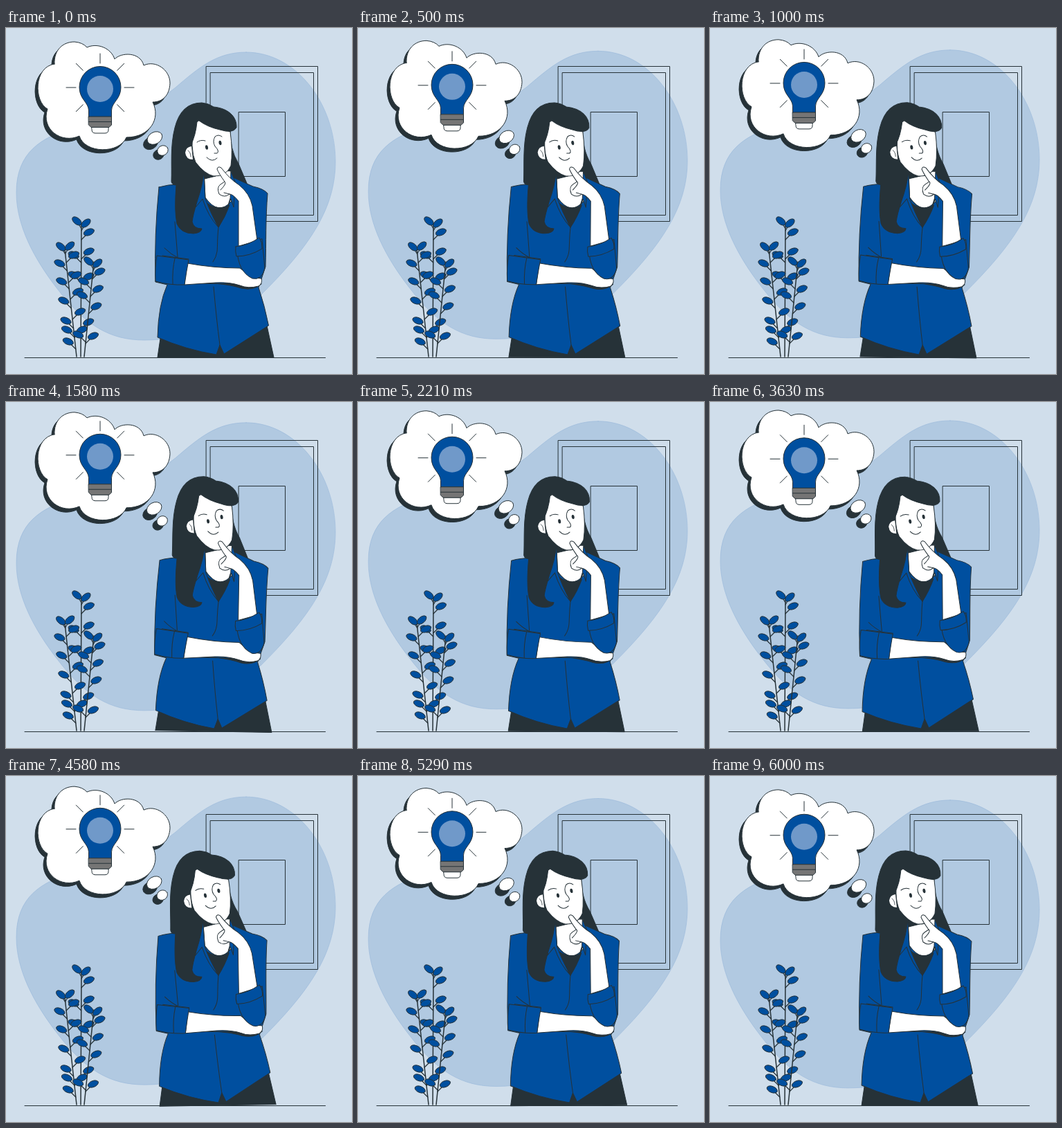
Recreate the animation shown at these times as an HTML page with a canvas. Size 500 by 500 pixels, loop 6.04 s.

```html
<!DOCTYPE html>
<html lang="en">
<head>
<meta charset="utf-8">
<title>Thinking of an idea</title>
<style>
html, body { margin: 0; width: 100%; height: 100%; overflow: hidden; background: #d0deeb; }
canvas { display: block; width: 500px; height: 500px; }
</style>
</head>
<body>
<canvas id="stage"></canvas>
<script>
const LOOP = 6040, STEPS = 144;
const BLUE = '#004f9f', DARK = '#263238', WHITE = '#fff', PALE = '#b1c9e1', GREY = '#757575';

const canvas = document.getElementById('stage');
const ctx = canvas.getContext('2d');
const ratio = window.devicePixelRatio || 1;
canvas.width = canvas.height = 500 * ratio;

function paint(path, fill, stroke = DARK, width = 1) {
  if (fill) { ctx.fillStyle = fill; ctx.fill(path); }
  if (stroke) { ctx.strokeStyle = stroke; ctx.lineWidth = width; ctx.stroke(path); }
}
const shape = (d, fill, stroke, width) => paint(new Path2D(d), fill, stroke, width);
const line = (d, width) => shape(d, null, DARK, width);

function oval(x, y, rx, ry, deg, fill, stroke) {
  const p = new Path2D();
  p.ellipse(x, y, rx, ry, deg * Math.PI / 180, 0, 7);
  paint(p, fill, stroke);
}

function moved(dx, dy, draw) {
  ctx.save();
  ctx.translate(dx, dy);
  draw();
  ctx.restore();
}

const blob = new Path2D(`M347 35C420 35 476 110 476 193C476 260 440 315 366 388
  C325 425 265 451 200 451C150 451 115 430 75 378C40 333 15 285 15 238
  C15 120 160 155 245 86C280 56 305 35 347 35Z`);

const cloud = new Path2D(`M70 52C69 32 82 20 99 20Q111 21 117 28C132 21 152 29 157 45
  C166 35 194 34 199 54C216 46 237 60 237 80C236 98 226 107 212 107
  C224 131 208 158 174 158C164 182 114 182 106 156C80 168 50 146 60 117
  C40 106 40 56 70 52Z`);

function picture() {
  ctx.strokeStyle = DARK;
  ctx.lineWidth = 1;
  ctx.strokeRect(289.5, 55.5, 161, 224);
  ctx.strokeRect(295.5, 64.5, 149, 206);
  ctx.strokeRect(336.5, 121.5, 67, 93);
}

function thought(lift) {
  moved(-4, lift + 5, () => paint(cloud, DARK));
  moved(0, lift, () => paint(cloud, WHITE));
  moved(lift * 0.15, lift, () => {
    oval(209, 166.5, 11, 8.5, -30, DARK);
    oval(215, 159, 11.5, 8.5, -30, WHITE);
    oval(220.5, 183, 8, 7, -30, DARK);
    oval(226.5, 177, 8, 7, -30, WHITE);
  });
}

function bulb() {
  for (let i = 0; i < 7; i++) {
    const a = (i + 3) * Math.PI / 4, c = Math.cos(a), s = Math.sin(a);
    line(`M${136 + 35 * c} ${86 + 35 * s}L${136 + 49 * c} ${86 + 49 * s}`);
  }
  shape('M124 143H148V147Q148 152 143 152H129Q124 152 124 147Z', WHITE);
  shape('M119.5 128V119C119 107 106 103 106 85.5A30 30 0 0 1 166 85.5C166 103 153 107 152.5 119V128Z', BLUE);
  oval(136, 88, 19, 19, 0, '#7099c9', null);
  shape('M119.5 128H152.5V140L149 143.5H123L119.5 140ZM119.5 135.5H152.5', GREY);
}

// Stems lean from the foot to the tip; leaves sit at the given heights
const stems = [
  { foot: 108, tip: 109, top: 282, left: [279, 328, 357], right: [282, 295, 323, 359, 425] },
  { foot: 102, tip: 85, top: 320, left: [316, 340, 366, 394, 423, 436, 453], right: [315, 328, 357, 381, 410, 436] },
  { foot: 113, tip: 127, top: 338, left: [337, 366, 386, 443], right: [340, 352, 377, 402, 445] }
];

function plant() {
  for (const { foot, tip, top, left, right } of stems) {
    const stemX = y => foot + (tip - foot) * Math.min(1, (475 - y) / (475 - top));
    line(`M${foot} 475L${tip} ${top}`, 1.5);
    const leaf = side => y => {
      const sx = stemX(y + 11), nearTop = y < top + 4;
      const x = sx + side * (nearTop ? 6.5 : 11);
      line(`M${sx} ${y + 11}L${x} ${y}`, 1.2);
      oval(x, y, 8, 4.5, -side * (nearTop ? 40 : 22), BLUE);
    };
    left.forEach(leaf(-1));
    right.forEach(leaf(1));
  }
}

function clothes() {
  shape('M225 435L219 476H387L377 430Z', DARK);
  shape(`M221 230Q235 226 248 226L280 216L324 214L357 229Q372 232 378 239
    C375 275 376 310 375 345L365 375Q374 402 379.5 430L315 471L309 458L304 472
    Q260 465 219 447Q220 400 233 371L216 367Q214 300 221 230Z`, BLUE);
  shape('M286 207L288 245Q307 272 326 250V207Z', WHITE);
  shape('M285 206L303 214L287 218Z', DARK);
  shape('M290 253Q307 265 323 256Q317 273 307 288Q298 275 290 253Z', DARK);
  shape('M286 210L279 217L274 259L284 247Q292 272 307 288Q294 264 288 246Z', BLUE);
  shape('M325 207L331 222L329 259L325 247Q317 270 307 288Q318 268 324 246Z', BLUE);
  line('M307 288C305 306 306 315 305 323Q304 331 299 338M300 374Q304 420 309 458M244 280L248 331');
  line('M229 318Q238 327 250 333M226 329L264 334');
}

function arms() {
  shape('M253 369Q310 366 340 376Q358 380 369 370Z', DARK);
  shape(`M262 340Q300 347 338 347L352 358Q360 362 369 362Q371 369 365 373
    Q350 377 338 372Q323 367 303 368L258 371Z`, WHITE);
  shape('M216 366Q215 345 218 329L264 335Q261 350 258 371Q237 372 216 366Z', BLUE);
  line('M244 333Q240 350 241 370');
  shape('M334 320Q335 352 356 362Q370 365 374 347L370 305Z', BLUE);
  shape(`M336 315V250Q328 240 323 240Q316 246 308 240Q304 230 310 226L316 222
    Q308 211 305 204Q306 199 311 202Q323 218 337 227Q352 239 356 257L363 307Z`, WHITE);
  line('M316 222Q320 224 310 234M323 240L315 238');
  shape('M332 316Q350 314 366 303Q371 310 370 319Q352 330 333 330Q331 323 332 316Z', BLUE);
}

function head() {
  shape(`M272 137Q265 175 274 194Q287 211 300 214Q318 215 325 199Q328 178 324 150L278 128Z`, WHITE);
  shape(`M276 136Q274 156 267 169Q258 182 270 187Q275 203 286 208
    Q284 228 276 251Q270 271 269 280Q271 290 283 290Q282 296 271 297Q253 297 247 283
    Q243 264 246 227Q240 227 239 222C240 198 237 171 244 144Q253 108 283 108
    Q293 109 300 114C321 116 334 128 333 144Q328 153 309 147Q291 143 279 134Z`, DARK);
  shape('M268 171Q260 172 259 180Q260 190 270 190Z', WHITE, null);
  line('M263 177Q267 180 267 186', 0.8);
  oval(290, 172.5, 2, 3.2, -8, DARK, null);
  oval(309.5, 166, 2, 3.2, -8, DARK, null);
  line('M276 165Q281 161 288 163M312 157Q307 153 302 157Q298 164 302 171Q309 178 305 181H301M290 187Q298 195 305 188');
}

function woman(angle) {
  ctx.save();
  ctx.translate(301, 292);
  ctx.rotate(angle * Math.PI / 180);
  ctx.translate(-301, -292);
  shape('M270 125L324 145Q323 175 336 196L350 229L320 214H285L262 190Z', DARK);
  clothes();
  head();
  arms();
  ctx.restore();
}

// Linear rise and fall: 0 -> 1 -> 0 over one unit
const wave = u => 1 - Math.abs(1 - 2 * (u - Math.floor(u)));

function draw(now) {
  const u = Math.floor((now % LOOP + 4) * STEPS / LOOP) / STEPS;
  ctx.setTransform(ratio, 0, 0, ratio, 0, 0);
  ctx.lineJoin = ctx.lineCap = 'round';
  ctx.fillStyle = '#d0deeb';
  ctx.fillRect(0, 0, 500, 500);
  const lift = -10 * wave(u);
  moved(0, lift, () => paint(blob, PALE, '#9dbbdc', 0.7));
  picture();
  line('M27 476.5H461.5');
  plant();
  thought(lift);
  moved(0, -9.5 * wave(2 * u), bulb);
  woman(2 * wave(u + 0.25) - 1);
}

const start = performance.now();
function tick() {
  draw(performance.now() - start);
  requestAnimationFrame(tick);
}
tick();
</script>
</body>
</html>
```
